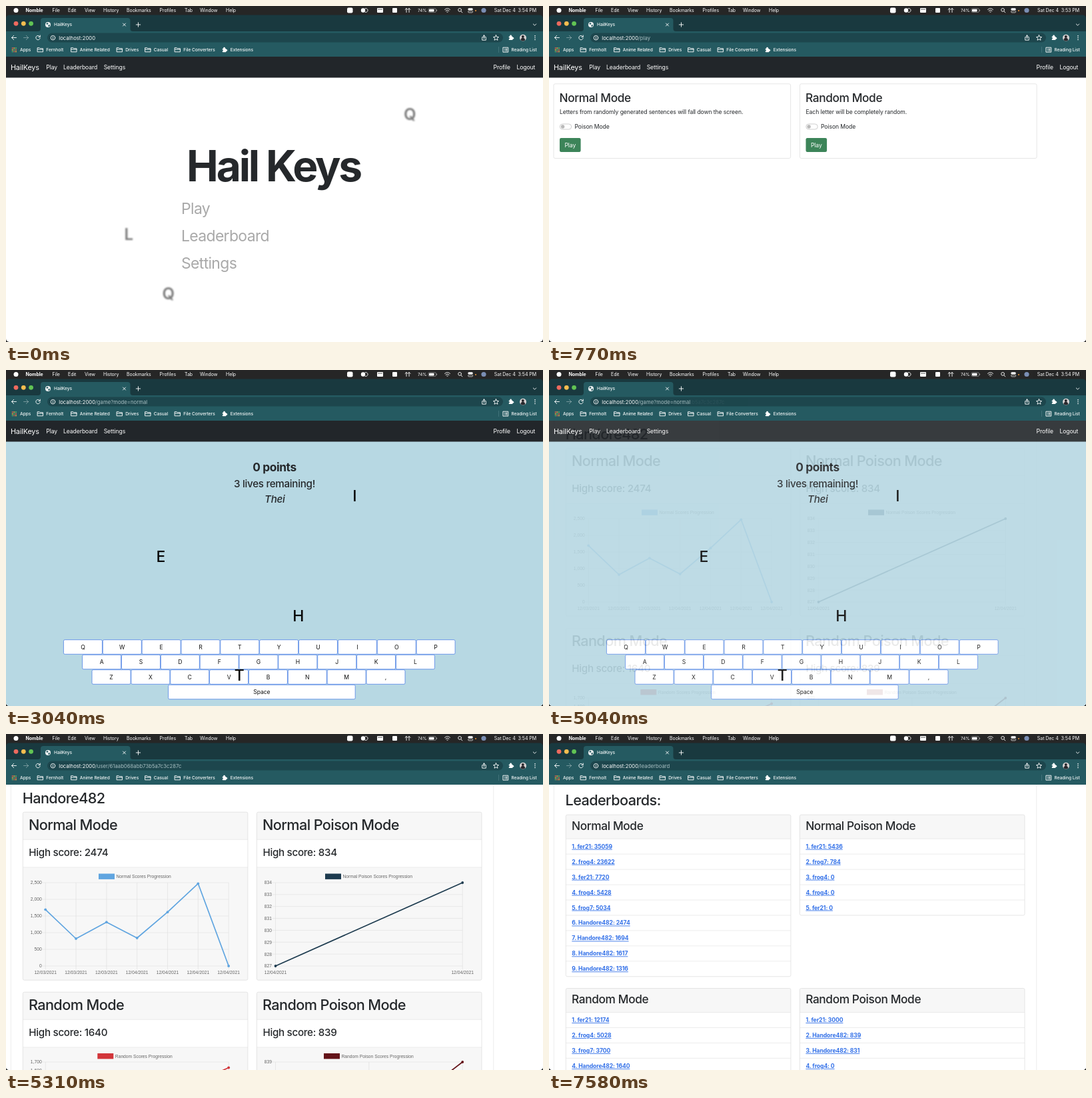
An HTML page for the animation above (8000 ms loop, 806x504 px).

```html
<!DOCTYPE html>
<html lang="en">
<head>
<meta charset="utf-8">
<title>HailKeys</title>
<style>
html, body { margin: 0; width: 100%; height: 100%; overflow: hidden; background: #262626; }
#stage { position: relative; width: 806px; height: 504px; overflow: hidden; clip-path: inset(0 round 0 0 5px 5px); }
svg { position: absolute; left: 0; top: 0; width: 806px; height: 504px; }
text { font-family: Inter, "Open Sans", sans-serif; white-space: pre; }
.chart text { font-family: "Liberation Sans", Arial, sans-serif; }
.blur { filter: blur(1.2px); }
.icon { fill: none; stroke: #fff; stroke-width: .9; stroke-linecap: round; stroke-linejoin: round; }
</style>
</head>
<body>
<div id="stage"></div>
<script>
const LOOP = 8000, FADE = 300;
const INK = '#25282b', BAR = '#262626', TEAL = '#255a61', DEEP = '#1d464d';
const BODY = 8.65, H4 = 15.2, H2 = 17.3, H1 = 21.7;
const PLAYER = 'Handore482';

// y is the middle of the capitals; larger text is set tighter
function text(x, y, str, size = BODY, { weight = 400, fill = INK, anchor = 'start', gap = -0.0013 * size, extra = '' } = {}) {
  return `<text x="${x}" y="${y + size * 0.364}" font-size="${size}" font-weight="${weight}" fill="${fill}"
    text-anchor="${anchor}" letter-spacing="${gap * size}" ${extra}>${str}</text>`;
}
const rect = (x, y, w, h, fill, more = '') =>
  `<rect x="${x}" y="${y}" width="${w}" height="${h}" fill="${fill}" ${more}/>`;
const circle = (x, y, r, fill) => `<circle cx="${x}" cy="${y}" r="${r}" fill="${fill}"/>`;
const line = (x1, y1, x2, y2, stroke = '#dfdfdf', width = .6) =>
  `<path d="M${x1} ${y1}L${x2} ${y2}" stroke="${stroke}" stroke-width="${width}"/>`;
const icon = (x, y, d, more = '') => `<path class="icon" transform="translate(${x} ${y})" d="${d}" ${more}/>`;
const each = (list, draw) => list.map(draw).join('');
const white = { fill: '#fff' };

const FOLDER = 'M-4-3h2.8l1 1.1h4.2v5h-8zM-4-.6h8';
const puzzle = (x, y) => rect(x - 3.2, y - 2, 5.6, 5.6, '#fff', 'rx=".7"') +
  circle(x - .4, y - 2.5, 1.4, '#fff') + circle(x + 2.8, y + .8, 1.4, '#fff') +
  circle(x - 3, y + .8, 1, TEAL);

function menuBar() {
  const menus = [['File', 69.5], ['Edit', 93], ['View', 118], ['History', 146], ['Bookmarks', 181],
    ['Profiles', 230.5], ['Tab', 268], ['Window', 291], ['Help', 330]];
  return rect(0, 0, 806, 504, BAR) + circle(15, 6.5, 3.5, '#fff') +
    text(29.5, 6.5, 'Nomble', 7.04, { weight: 700, fill: '#fff' }) +
    each(menus, ([name, x]) => text(x, 6.5, name, 7.04, white)) +
    rect(512, 2.5, 8.5, 8, '#fff', 'rx="2"') +
    circle(536, 6.5, 3.2, '#fff') + icon(540.5, 6.5, 'M-1.5-2.8a3 3 0 1 1 0 5.6') +
    rect(557, 3, 9, 7, '#fff', 'rx="1"') + line(558, 5, 565, 5, '#111', .7) +
    rect(580, 3, 7, 7, '#fff', 'rx="1"') +
    icon(603, 6.5, 'M-2 3v-6M2 3v-6M-4-1l2-2 2 2 2-2 2 2') +
    text(618, 6.5, '74%', 6.3, white) +
    rect(634, 3.8, 11.5, 5.6, 'none', 'rx="1.5" stroke="#aaa" stroke-width=".6"') +
    rect(635, 4.8, 7.5, 3.6, '#fff', 'rx=".7"') + rect(646.2, 5.6, .9, 2, '#aaa') +
    icon(662.5, 6.5, 'M-4-1.2q4-3.5 8 0M-2.5.7q2.5-2.2 5 0M-.6 2.5h1.2', 'stroke-width="1.2"') +
    icon(681.5, 6.3, 'M2-.4a2.4 2.4 0 1 1-4.8 0a2.4 2.4 0 1 1 4.8 0M1.4 1.6l2 2') +
    rect(693.3, 3.2, 7.5, 3, '#fff', 'rx="1.5"') +
    rect(693.6, 7.2, 7, 2.7, 'none', 'rx="1.3" stroke="#fff" stroke-width=".7"') +
    circle(705, 7, 1, '#ef9a3c') + circle(717, 6.5, 3.6, '#7b8fb5');
}

function browser() {
  const folders = [['Fernholt', 51.5], ['Anime Related', 102], ['Drives', 170.5], ['Casual', 213], ['File Converters', 257.5]];
  const small = (x, y, str) => text(x, y, str, 6.65, { fill: '#f3f7f7', weight: 500 });
  const apps = ['#e05a4f', '#e8a33d', '#58b368'];
  return rect(0, 13.6, 806, 40, '#19393f', 'rx="5"') +
    each(['#ee6a5f', '#f5bd4f', '#61c454'], (c, i) => circle(15 + i * 11.3, 26.3, 3.4, c)) +
    `<path d="M48 38q4 0 4-4V22q0-4 4-4h126.5q4 0 4 4v12q0 4 4 4z" fill="${TEAL}"/>` +
    rect(0, 38, 806, 38, TEAL) +
    circle(63, 28, 4, '#f1f3f4') +
    `<path d="M60 26.5l2.5-1.5 1 1.5-1.5 1.5zM63.5 28.5l2.5-.5-.5 2.5-2 .5z" fill="${TEAL}"/>` +
    small(72, 28, 'HailKeys') +
    icon(177.5, 28, 'M-2-2l4 4M2-2l-4 4') + icon(198.5, 28, 'M-3.2 0h6.4M0-3.2v6.4', 'stroke-width="1.2"') +
    icon(793.5, 28, 'M-2.2-1l2.2 2.2 2.2-2.2') +
    icon(12, 47.5, 'M3.5 0h-7M-.3-3.2L-3.5 0l3.2 3.2') +
    icon(30, 47.5, 'M-3.5 0h7M.3-3.2L3.5 0l-3.2 3.2', 'opacity=".4"') +
    icon(48, 47.5, 'M2.5-2A3.2 3.2 0 1 0 3.2.7M3.3-3.5v2.5h-2.5') +
    rect(62, 40.6, 684, 14, DEEP, 'rx="7"') +
    icon(70.5, 47.7, 'M3.3 0a3.3 3.3 0 1 1-6.6 0a3.3 3.3 0 1 1 6.6 0M0-.2v1.7M0-1.6v.1', 'stroke-width=".7"') +
    icon(717.5, 47.7, 'M-1.3-1H-2.8v4.5h5.6V-1H1.3M0 1.2v-5M-1.5-2.4L0-3.9l1.5 1.5', 'stroke-width=".8"') +
    icon(735.5, 47.7, 'M0-4l1.2 2.6 2.8.3-2.1 1.9.6 2.8L0 2.2-2.5 3.6l.6-2.8L-4-1.1l2.8-.3z', 'stroke-width=".8"') +
    puzzle(758, 47.5) + circle(776, 47.7, 5, '#d8d3d3') +
    `<path d="M772.5 51.2q0-3.5 3.2-3.5t3.5 3.5q-3 2.5-6.7 0z" fill="#29282d"/>` + circle(775.8, 46, 2, '#29282d') +
    each([-2.8, 0, 2.8], d => circle(794, 47.7 + d, .8, '#fff')) +
    each([0, 1, 2], r => each(apps, (c, i) => rect(8.8 + i * 2.6, 62.3 + r * 2.6, 1.8, 1.8, apps[(i + r) % 3]))) +
    small(21, 65.7, 'Apps') +
    each(folders, ([name, x]) => icon(x, 65.7, FOLDER, 'stroke-width=".8"') + small(x + 8.8, 65.7, name)) +
    puzzle(328, 65.7) + small(336.8, 65.7, 'Extensions') +
    line(739.5, 61, 739.5, 70, '#55838a') +
    icon(750, 65.7, 'M-3.7-3.5h7.4v7h-7.4zM-1.8-1.5h.1M0-1.5h2M-1.8 0h.1M0 0h2M-1.8 1.5h.1M0 1.5h2', 'stroke-width=".8"') +
    small(758.5, 65.7, 'Reading List');
}

const page = (fill, body) => rect(0, 76, 806, 428, fill) + body;

const navBar = () => rect(0, 76, 806, 31.5, '#22262a') +
  text(7, 92, 'HailKeys', 10.8, white) +
  each([['Play', 60.3], ['Leaderboard', 86], ['Settings', 146.7], ['Profile', 731.5], ['Logout', 766.5]],
    ([name, x]) => text(x, 92, name, BODY, white));

function home() {
  const drop = (x, y, ch) => text(x, y, ch, 24, { weight: 600, fill: '#7c7c7c', anchor: 'middle', extra: 'class="blur"' });
  return page('#fff', navBar() +
    drop(606, 162, 'Q') + drop(184, 342, 'L') + drop(243.5, 431, 'Q') +
    text(401.5, 240, 'Hail Keys', 64, { weight: 700, anchor: 'middle', gap: -.05 }) +
    each(['Play', 'Leaderboard', 'Settings'], (s, i) => text(263, 304 + i * 41, s, 23, { fill: '#a9a9a9' })));
}

function modes() {
  const card = (x, title, note) =>
    rect(x, 116.8, 355.6, 111.7, '#fff', 'rx="2.2" stroke="#dcdcdc" stroke-width=".7"') +
    text(x + 8.5, 137.3, title, H2, { weight: 500 }) +
    text(x + 9, 159, note) +
    rect(x + 9.3, 177, 17.4, 8, '#fff', 'rx="4" stroke="#b9b9b9" stroke-width=".7"') +
    circle(x + 13.6, 181, 2.7, '#b9b9b9') +
    text(x + 31.5, 181.2, 'Poison Mode') +
    rect(x + 9, 198, 31.6, 21, '#3c8459', 'rx="2.2"') +
    text(x + 24.8, 208.8, 'Play', BODY, { fill: '#fff', anchor: 'middle' });
  return page('#fff', navBar() +
    card(7, 'Normal Mode', 'Letters from randomly generated sentences will fall down the screen.') +
    card(376.5, 'Random Mode', 'Each letter will be completely random.'));
}

function game() {
  const mid = { anchor: 'middle' };
  const key = (x, y, w, label) =>
    rect(x + .4, y + .4, w - .8, 21.6, '#fff', 'rx="2" stroke="#5f8ee8" stroke-width=".9"') +
    text(x + w / 2, y + 11.4, label, BODY, { ...mid, fill: '#111' });
  const rows = [['QWERTYUIOP', 86], ['ASDFGHJKL', 114.2], ['ZXCVBNM,', 128.6]];
  return page('#b7d8e3', navBar() +
    text(403, 146, '0 points', H2, { ...mid, weight: 700 }) +
    text(403, 170, '3 lives remaining!', H4, { ...mid, weight: 500 }) +
    text(403.3, 193.5, 'Thei', H4, { ...mid, weight: 500, extra: 'font-style="italic"' }) +
    each(rows, ([keys, x], r) => each([...keys], (ch, i) => key(x + i * 58.85, 404.3 + r * 22.5, 58.85, ch))) +
    key(243.2, 471.8, 281.4, 'Space') +
    each([['I', 523, 189], ['E', 232, 280], ['H', 438.5, 369], ['T', 350, 457.5]],
      ([ch, x, y]) => text(x, y, ch, 23, { ...mid, weight: 500, fill: '#080808' })));
}

const panel = body => page('#fff', line(7.3, 76, 7.3, 504) + line(731.7, 76, 731.7, 504) + body);

// ticks: [label, y]; columns: [x, date]; values: points of the curve
function chart({ legend, color, legendX, legendY, ticks, columns, values }) {
  const left = columns[0][0], right = columns.at(-1)[0];
  const top = ticks[0][1], bottom = ticks.at(-1)[1];
  const label = (x, y, s, anchor) => text(x, y, s, 6.72, { fill: '#666', anchor, gap: 0 });
  return `<g class="chart">` +
    rect(legendX, legendY - 4.2, 24, 8.4, color) + label(legendX + 26.5, legendY, legend) +
    each(ticks, ([s, y]) => line(left - 5, y, right, y, '#dedede') + label(left - 5.5, y, s, 'end')) +
    each(columns, ([x, date]) => line(x, top, x, bottom + 5, '#dedede') + label(x, bottom + 10, date, 'middle')) +
    `<polyline points="${values.join(' ')}" fill="none" stroke="${color}" stroke-width="1.7" stroke-linejoin="round"/>` +
    each(values, ([x, y]) => circle(x, y, 1.9, color)) + `</g>`;
}

function profile() {
  const card = (x, y, title, score) =>
    rect(x, y, 337.6, 252, '#f7f7f7', 'rx="2.2"') +
    rect(x, y + 41, 337.6, 41.7, '#fff') +
    line(x, y + 41, x + 337.6, y + 41) + line(x, y + 82.7, x + 337.6, y + 82.7) +
    rect(x, y, 337.6, 252, 'none', 'rx="2.2" stroke="#dcdcdc" stroke-width=".7"') +
    text(x + 8.6, y + 19.2, title, H1, { weight: 500 }) +
    text(x + 9, y + 60, 'High score: ' + score, H4, { weight: 500 });
  const scale = (count, first, step, top, gap) =>
    Array.from({ length: count }, (_, i) => [(first - i * step).toLocaleString('en-US'), top + i * gap]);
  const day = n => `12/0${n}/2021`;
  const scores = [1694, 820, 1316, 840, 1617, 2474, 0];
  const colX = i => 59.2 + i * 45.83;
  return panel(
    text(24.7, 95.8, PLAYER, H1, { weight: 500 }) +
    card(25.3, 117.2, 'Normal Mode', 2474) + card(376.4, 117.2, 'Normal Poison Mode', 834) +
    card(25.3, 387.2, 'Random Mode', 1640) + card(376.4, 387.2, 'Random Poison Mode', 839) +
    chart({ legend: 'Normal Scores Progression', color: '#60a5e0', legendX: 139, legendY: 213.7,
      ticks: scale(6, 2500, 500, 223, 25), columns: scores.map((_, i) => [colX(i), day(i < 3 ? 3 : 4)]),
      values: scores.map((s, i) => [colX(i), 348 - s / 20]) }) +
    chart({ legend: 'Normal Poison Scores Progression', color: '#1d3b4f', legendX: 479, legendY: 213.7,
      ticks: scale(8, 834, 1, 223, 125 / 7), columns: [[404.5, day(4)], [685.2, day(4)]],
      values: [[404.5, 348], [685.2, 223]] }) +
    chart({ legend: 'Random Scores Progression', color: '#d2353a', legendX: 137.3, legendY: 483.2,
      ticks: scale(6, 1700, 100, 492, 13), columns: [[59.2, day(3)], [334.2, day(4)]],
      values: [[288.4, 521], [334.2, 500.5]] }) +
    chart({ legend: 'Random Poison Scores Progression', color: '#641319', legendX: 477, legendY: 483.2,
      ticks: scale(6, 839, 1, 492, 18), columns: [[404.5, day(4)], [544.8, day(4)], [685.2, day(4)]],
      values: [[544.8, 600], [685.2, 492]] }));
}

function leaderboard() {
  const rowH = 22.95;
  const card = (x, y, title, rows) => {
    const h = 36 + rows.length * rowH;
    return rect(x, y, 337.6, h, '#fff', 'rx="2.2"') + rect(x, y, 337.6, 36, '#f7f7f7', 'rx="2.2"') +
      each(rows, ([name, score], i) => line(x, y + 36 + i * rowH, x + 337.6, y + 36 + i * rowH) +
        text(x + 9, y + 47.4 + i * rowH, `${i + 1}. ${name}: ${score}`, BODY,
          { weight: 700, fill: '#3270e8', extra: 'text-decoration="underline"' })) +
      rect(x, y, 337.6, h, 'none', 'rx="2.2" stroke="#dcdcdc" stroke-width=".7"') +
      text(x + 8.8, y + 16.2, title, H2, { weight: 500 });
  };
  const [a, b, c] = ['fer21', 'frog4', 'frog7'];
  return panel(
    text(24.5, 99.5, 'Leaderboards:', H1, { weight: 500 }) +
    card(25.3, 121.2, 'Normal Mode', [[a, 35059], [b, 23622], [a, 7720], [b, 5428], [c, 5034],
      ...[2474, 1694, 1617, 1316].map(s => [PLAYER, s])]) +
    card(376.4, 121.2, 'Normal Poison Mode', [[a, 5436], [c, 784], [b, 0], [b, 0], [a, 0]]) +
    card(25.3, 381.5, 'Random Mode', [[a, 12174], [b, 5028], [c, 3700], [PLAYER, 1640]]) +
    card(376.4, 381.5, 'Random Poison Mode', [[a, 3000], [PLAYER, 839], [PLAYER, 831], [b, 0]]));
}

const scenes = [
  { start: 0, path: '', clock: '3:54', draw: home },
  { start: 500, path: '/play', clock: '3:53', draw: modes },
  { start: 2770, path: '/game?mode=normal', clock: '3:54', draw: game },
  { start: 5040, path: '/user/61aab068abb73b5a7c3c287c', clock: '3:54', draw: profile },
  { start: 7310, path: '/leaderboard', clock: '3:54', draw: leaderboard },
];

const address = path => rect(78, 42, 220, 11.5, DEEP) +
  text(79.3, 47.7, `localhost:2000<tspan fill="#a9c1c4">${path}</tspan>`, 7.7, { fill: '#fff', gap: .004 });
const clock = time => rect(727, 0, 75, 13, BAR) +
  text(796, 6.5, `Sat Dec 4\u00a0 ${time} PM`, 7.04, { fill: '#fff', anchor: 'end' });
const layer = body => `<svg viewBox="0 0 806 504">${body}</svg>`;

const stage = document.getElementById('stage');
stage.innerHTML = layer(menuBar() + browser()) +
  each(scenes, s => layer(clock(s.clock) + address(s.path) + s.draw()));

// each later scene fades in over the one before in ten even steps
scenes.slice(1).forEach(({ start }, i) => {
  stage.children[i + 2].animate([
    { opacity: 0, offset: 0 },
    { opacity: 0, offset: start / LOOP, easing: 'steps(10, start)' },
    { opacity: 1, offset: (start + FADE) / LOOP },
    { opacity: 1, offset: 1 },
  ], { duration: LOOP, iterations: Infinity });
});
</script>
</body>
</html>
```
